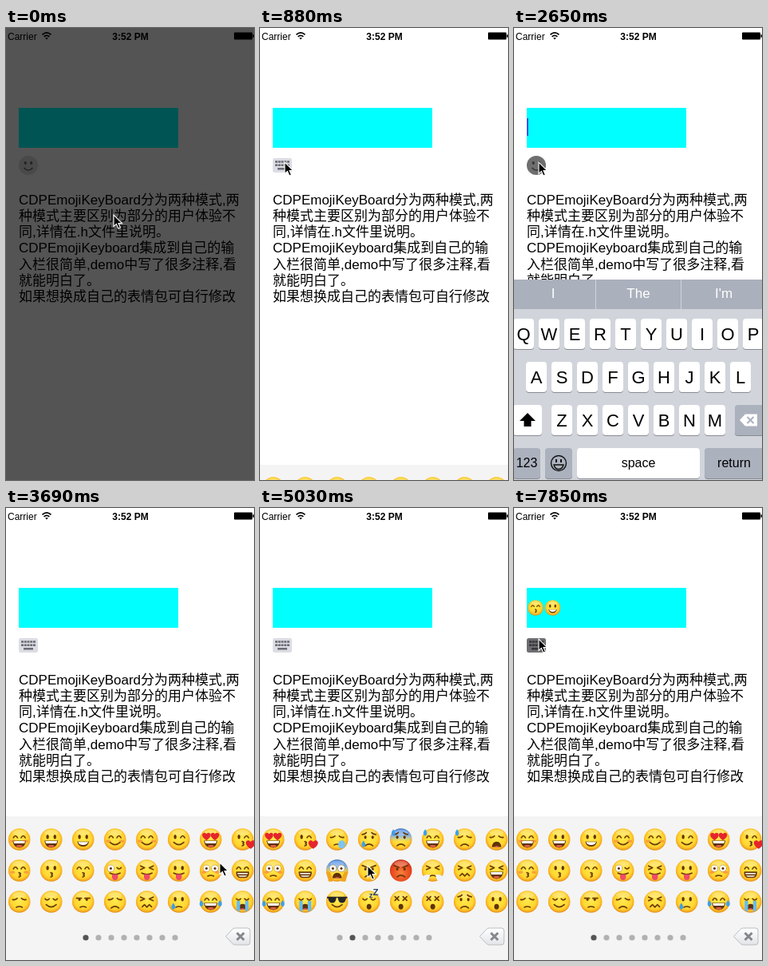
Recreate the animation shown at these times as an HTML page. Size 311 px wide and 566 px high, loop 7.99 s.

```html
<!DOCTYPE html>
<html lang="zh-CN">
<head>
<meta charset="utf-8">
<title>Emoji keyboard</title>
<style>
html, body { margin: 0; width: 100%; height: 100%; overflow: hidden; background: #fff; }
svg { display: block; width: 100%; height: 100%; }
text { font-family: "Liberation Sans", "Noto Sans CJK SC", "Noto Sans CJK", sans-serif; }
.key { font-size: 22px; text-anchor: middle; }
.small { font-size: 16px; text-anchor: middle; }
.hint { font-size: 17px; text-anchor: middle; fill: #fff; }
.line { fill: none; stroke: #6b3a08; stroke-width: 1.6; stroke-linecap: round; stroke-linejoin: round; }
</style>
</head>
<body>
<svg viewBox="0 0 311 566">
  <defs>
    <radialGradient id="yellow" cy=".45" r=".55"><stop offset="0" stop-color="#ffea4f"/><stop offset=".7" stop-color="#ffd52e"/><stop offset=".88" stop-color="#f9b021"/><stop offset="1" stop-color="#de8a12"/></radialGradient>
    <radialGradient id="red" cy=".6" r=".6"><stop offset="0" stop-color="#f9803a"/><stop offset=".7" stop-color="#e8491f"/><stop offset="1" stop-color="#c62a12"/></radialGradient>
    <radialGradient id="purple" cy=".4" r=".65"><stop offset="0" stop-color="#a45fc8"/><stop offset="1" stop-color="#5b2380"/></radialGradient>
    <linearGradient id="cold" x2="0" y2="1"><stop offset="0" stop-color="#3f7fe0"/><stop offset=".3" stop-color="#79ade8"/><stop offset=".6" stop-color="#a5c5dc" stop-opacity="0"/></linearGradient>
    <linearGradient id="button" x2="0" y2="1"><stop offset="0" stop-color="#fff"/><stop offset="1" stop-color="#e2e4e8"/></linearGradient>
  </defs>
  <rect width="311" height="566" fill="#fff"/>
  <text x="2" y="14.5" font-size="12">Carrier</text>
  <g fill="none" stroke="#000" stroke-width="1.7">
    <path d="M45.5 8.3Q51 3.4 56.5 8.3M47.6 10.8Q51 7.8 54.4 10.8"/>
    <path d="M51 14.6L49.2 12.6Q51 11.2 52.8 12.6Z" fill="#000" stroke="none"/>
  </g>
  <text x="156" y="14.5" font-size="12" font-weight="bold" text-anchor="middle">3:52 PM</text>
  <path d="M287 5.500h21q1 0 1 1v7q0 1-1 1h-21q-1 0-1-1v-7q0-1 1-1zM309.500 8.200h1.500v3.600h-1.500z"/>
  <rect x="16" y="100" width="200" height="50" fill="#0ff"/>
  <rect id="caret" x="16" y="113" width="2" height="22" fill="#3a55e0"/>
  <g id="typed"></g>
  <g id="smiley">
    <circle cx="28" cy="172" r="12" fill="#dedee0"/>
    <ellipse cx="24.3" cy="169" rx="1.6" ry="2.1" fill="#68686c"/><ellipse cx="31.7" cy="169" rx="1.6" ry="2.1" fill="#68686c"/>
    <path d="M22.5 175Q28 181 33.5 175" fill="none" stroke="#68686c" stroke-width="1.6"/>
  </g>
  <g id="board">
    <rect x="16" y="163" width="24" height="18" rx="2.5" fill="#dcdde4"/>
    <path d="M19 167.500H37M19 171.800H37" stroke="#6b6b74" stroke-width="2.500" stroke-dasharray="3 .75"/>
    <path d="M22 176.300H34" stroke="#6b6b74" stroke-width="2.500"/>
  </g>
  <g id="pressed" fill="#000" opacity=".5"><rect id="pressBox" x="16" y="163" width="24" height="18" rx="2.5"/><circle id="pressDot" cx="28" cy="172" r="12"/></g>
  <g id="note" font-size="17" font-weight="300"></g>
  <g id="panel">
    <rect width="311" height="182" fill="#f4f4f4"/>
    <g id="pages"></g>
    <g id="dots"></g>
    <path d="M275.5 150.5L284 141.5Q285.5 140 287.500 140H303Q306 140 306 143V158Q306 161 303 161H287.500Q285.500 161 284 159.500Z" fill="url(#button)" stroke="#b9bcc3"/>
    <path d="M289.500 146l9 9m0-9l-9 9" stroke="#85878c" stroke-width="3"/>
  </g>
  <g id="keyboard"></g>
  <rect id="shade" width="311" height="566"/>
  <path id="pointer" d="M0 0V14.500L3.400 11.400L5.800 17L8.400 15.900L6 10.600H10.500Z" stroke="#fff" stroke-width="1.100"/>
</svg>
<script>
const $ = id => document.getElementById(id);
const line = d => `<path class="line" d="${d}"/>`;
const shape = (d, fill) => `<path d="${d}" fill="${fill}"/>`;
const oval = (x, y, rx, ry, fill) => `<ellipse cx="${x}" cy="${y}" rx="${rx}" ry="${ry}" fill="${fill}"/>`;
const brown = '#5f3208';
const heart = (x, y, s) => `<path transform="translate(${x} ${y}) scale(${s})" d="M0 4C-8-1-3-6 0-2.500C3-6 8-1 0 4Z" fill="#e5252a"/>`;
const drop = (x, y) => shape(`M${x} ${y}q4.500 5.500 0 8q-4.500-2.500 0-8`, '#3f9fe8');

// Left eye only; the right one is its mirror image.
const eyes = {
  o: oval(-4.3, -3, 1.6, 2.6, brown),
  u: line('M-7-2Q-4.600-6.500-2.200-2'),
  c: line('M-7.300-3.500Q-4.800-.500-2.300-3.500'),
  '>': line('M-7.500-5.500L-2.800-3.300L-7.500-1.200'),
  x: line('M-7-6l4.500 4.500m0-4.500l-4.500 4.500'),
  h: heart(-5, -3.5, 1.15),
  w: oval(-5, -2.5, 4.3, 4.3, '#a8741c') + oval(-5, -2.5, 3.8, 3.8, '#fff') + oval(-5, -2.5, 1.4, 1.6, brown),
  s: line('M-7.800-2.500Q-4.500-1.800-2.500-4'),
  a: oval(-4.3, -1.8, 1.4, 1.8, brown) + line('M-8-6L-2.200-3.800'),
  l: oval(-4.3, -2.5, 1.4, 1.5, brown) + line('M-7.800-4.200H-2'),
  W: oval(-4.3, -2.5, 1.4, 2, brown) + line('M-8-5.800Q-5-6.300-3.200-8'),
  g: shape('M-12-6H0V-4.500H-1Q-1.500 1.500-5.800 1.500T-10.500-4H-12Z', '#25252b')
};
const tongue = shape('M-3.500 4.500H3.500V8Q3 11.300 0 11.300T-3.500 8Z', '#ee4c68');
const mouths = {
  D: shape('M-8 1.500H8Q7 9.800 0 9.800T-8 1.500Z', brown) + shape('M-7 2H7L6.200 4.800H-6.200Z', '#fff') + oval(0, 8, 3.5, 1.3, '#e8604a'),
  N: shape('M-7 2.500H7Q5.500 8.500 0 8.500T-7 2.500Z', brown) + shape('M-6 3H6Q5 6.500 0 6.500T-6 3Z', '#fff'),
  S: line('M-6 3.500Q0 9 6 3.500'),
  k: line('M-.500 2.500Q3 3.500.300 5Q3 6.500-.500 7.500'),
  F: line('M-4.500 7.500Q0 3.500 4.500 7.500'),
  f: line('M-3.500 6.500Q0 4.800 3.500 6.500'),
  T: line('M-6 3Q0 6 6 3') + tongue,
  G: shape('M-7 2H7Q7 8 3 8H-3Q-7 8-7 2Z', '#fff') + line('M-7 2H7Q7 8 3 8H-3Q-7 8-7 2ZM-6 5H6'),
  O: oval(0, 6, 2.8, 3.3, brown),
  A: shape('M-5.500 9Q-5 2.500 0 2.500T5.500 9Z', brown) + shape('M-3.500 9Q0 6 3.500 9Z', '#ee4c68'),
  z: line('M-5.500 6l2.700-2.500 2.800 3 2.800-3 2.700 2.500'),
  m: shape('M-12.500 0Q0-2.500 12.500 0V4Q9 12 0 12.500T-12.500 4Z', '#f7f9fb') + '<path d="M-8 3H8M-7 6H7" stroke="#cdd6df"/>'
};
const extras = {
  b: oval(-8, 2, 2.8, 1.8, '#f4753e88') + oval(8, 2, 2.8, 1.8, '#f4753e88'),
  H: heart(9.5, 6, 1.3),
  t: drop(-6.5, 1.5),
  n: oval(5.5, 6, 4.2, 4.8, '#7cc4f2'),
  q: drop(-11, -2) + drop(11, -2),
  Q: shape('M-7-1h4v13l-4-2zM7-1h-4v13l4-2z', '#65bcf2'),
  d: drop(-9, -12),
  B: oval(0, 0, 13, 13, 'url(#cold)'),
  M: shape('M-13 2Q-9-1-7 5L-5 13H-10ZM13 2Q9-1 7 5L5 13H10Z', '#f0a51e'),
  Z: '<text y="-5" font-size="9" font-weight="bold" fill="#27436b">z<tspan dy="-3" font-size="11">Z</tspan></text>',
  v: shape('M-3 5Q-9 4-13 8Q-11 14-5 11ZM3 5Q9 4 13 8Q11 14 5 11Z', '#eef3f8'),
  p: shape('M-11-5Q-15-9-12-14Q-10-10-6-10ZM11-5Q15-9 12-14Q10-10 6-10Z', '#6f368f')
};

// Each face: left eye, right eye, mouth, extras.
const sheets = [
  'uuDb ooD ooN uuSb uuSb ouS hhD oukH uukb ook uuk wcT >>T ooT wwfb uuG ssf ccS llf ssF >>z oofft uuDq ccAQ',
  'ssfn WWFt WWFBd uuDd ssFd ssA >>A WWOB wwABM aaF aaFR >>fv >>z >>D uuTb oomW ggS ccOZ xxO xxO WWF ooO WWO aaSp'
].map(s => s.split(' '));

function face(code) {
  const [left, right, mouth, ...more] = code;
  const tone = more.includes('R') ? 'red' : more.includes('p') ? 'purple' : 'yellow';
  const cold = more.includes('B') ? extras.B : '';
  const over = more.filter(m => m !== 'B').map(m => extras[m] || '').join('');
  return oval(0, 0, 13, 13, `url(#${tone})`) + cold + oval(0, -8, 8, 3.5, '#fff4') +
    eyes[left] + `<g transform="scale(-1 1)">${eyes[right]}</g>` + mouths[mouth] + over;
}
const place = (x, y, body, scale = 1) => `<g transform="translate(${x} ${y}) scale(${scale})">${body}</g>`;

$('pages').innerHTML = sheets.map((sheet, p) => sheet.map((code, i) =>
  place(16.7 + 40 * (i % 8) + 320 * p, 29 + 39 * Math.floor(i / 8), face(code), 1.06)).join('')).join('');
$('typed').innerHTML = place(27, 125, face('uuk'), .75) + place(48.5, 125, face('ooN'), .75);
$('dots').innerHTML = Array.from({length: 8}, (_, i) => `<circle cx="${100 + 16 * i}" cy="152" r="3.600"/>`).join('');
$('note').innerHTML = ['CDPEmojiKeyBoard分为两种模式,两', '种模式主要区别为部分的用户体验不', '同,详情在.h文件里说明。',
  'CDPEmojiKeyboard集成到自己的输', '入栏很简单,demo中写了很多注释,看', '就能明白了。', '如果想换成自己的表情包可自行修改']
  .map((s, i) => `<text x="16" y="${220.8 + 20.2 * i}">${s}</text>`).join('');

function key(x, y, w, label = '', fill = '#fff', type = 'key') {
  const box = (dy, color) => `<rect x="${x - w / 2}" y="${y - 19 + dy}" width="${w}" height="38" rx="4" fill="${color}"/>`;
  return box(1, '#888b91') + box(0, fill) + `<text class="${type}" x="${x}" y="${y + (type === 'key' ? 8 : 5)}">${label}</text>`;
}
function buildKeyboard() {
  const gray = '#abb1bd';
  let out = `<rect width="311" height="260" fill="#d1d5db"/><rect width="311" height="37" fill="#aab0bc"/>
    <path d="M102.500 0V37M209.500 0V37" stroke="#d1d5db"/>`;
  ['I', 'The', "I'm"].forEach((s, i) => out += `<text class="hint" x="${49 + 107 * i}" y="23">${s}</text>`);
  [['QWERTYUIOP', 12], ['ASDFGHJKL', 28], ['ZXCVBNM', 60]].forEach(([row, x], r) =>
    [...row].forEach((c, i) => out += key(x + 32 * i, 68 + 54 * r, 26, c)));
  out += key(17, 176, 36) + shape('M17 167L27 177H21.500V184H12.500V177H7Z', '#000');
  out += key(295, 176, 36, '', gray) + shape('M283 176L290 168.500H305V183.500H290Z', '#fff') +
    `<path d="M292.500 172l8 8m0-8l-8 8" stroke="${gray}" stroke-width="2"/>`;
  out += key(16, 230, 34, '123', gray, 'small') + key(56, 230, 34, '', gray) +
    key(156, 230, 154, 'space', '#fff', 'small') + key(276, 230, 74, 'return', gray, 'small');
  return out + `<g fill="none" stroke="#111" stroke-width="1.400"><circle cx="56" cy="230" r="9.500"/>
    <path d="M50 232H62Q60.500 237.500 56 237.500T50 232Z"/><path d="M53 225v4M59 225v4" stroke-width="2"/></g>`;
}
$('keyboard').innerHTML = buildKeyboard();

// Motion tables: [tick, value...]
const LOOP = 7990, TICK = 148, LAST = 53;
const tracks = {
  pointer: [[0, 135, 234], [1, 135, 234], [4, 31, 168], [19, 31, 168], [22, 265, 523], [23, 265, 523], [25, 268, 444],
    [26, 268, 444], [30, 140, 444], [31, 140, 444], [33, 80, 448], [35, 190, 448], [37, 89, 450], [40, 89, 450],
    [41, 91, 448], [42, 91, 446], [44, 91, 446], [45, 95, 409], [47, 95, 409], [52, 31, 164]],
  shade: [[0, .67], [3, 0]],
  panel: [[5, 182], [6, 161], [7, 30], [8, 0], [12, 0], [13, 182], [18, 182], [19, 150], [20, 40], [21, 0]],
  keyboard: [[12, 253], [13, 150], [14, 17], [15, 0], [18, 0], [19, 253]],
  page: [[26, 0], [27, .08], [28, .35], [29, .85], [30, 1], [33, 1], [34, .75], [35, .2], [36, 0]]
};
function sample(track, t) {
  const i = track.findIndex(k => k[0] > t);
  if (i === 0) return track[0].slice(1);
  if (i < 0) return track[track.length - 1].slice(1);
  const a = track[i - 1], b = track[i], f = (t - a[0]) / (b[0] - a[0]);
  return a.slice(1).map((v, n) => v + (b[n + 1] - v) * f);
}
const show = (el, on) => el.style.display = on ? '' : 'none';
const move = (id, x, y) => $(id).setAttribute('transform', `translate(${x} ${y})`);

function render(tick) {
  const at = name => sample(tracks[name], tick);
  const [page] = at('page');
  const smiley = tick < 6 || (tick > 12 && tick < 19);
  move('pointer', ...at('pointer'));
  move('panel', 0, 386 + at('panel')[0]);
  move('keyboard', 0, 315 + at('keyboard')[0]);
  move('pages', -320 * page, 0);
  $('shade').setAttribute('opacity', at('shade')[0]);
  show($('smiley'), smiley);
  show($('board'), !smiley);
  show($('pressed'), [5, 12, 18, 53].includes(tick));
  show($('pressDot'), smiley);
  show($('pressBox'), !smiley);
  show($('caret'), tick > 12 && tick < 19 && tick !== 17);
  [44, 47].forEach((start, i) => show($('typed').children[i], tick >= start));
  [...$('dots').children].forEach((dot, i) => dot.setAttribute('fill', i === Math.round(page) ? '#555' : '#b1b1b1'));
}

const start = performance.now();
let shown = -1;
function frame() {
  const time = (performance.now() - start) % LOOP;
  const tick = Math.min(LAST, Math.floor((time + 16) / TICK));
  if (tick !== shown) render(shown = tick);
  requestAnimationFrame(frame);
}
frame();
</script>
</body>
</html>
```
